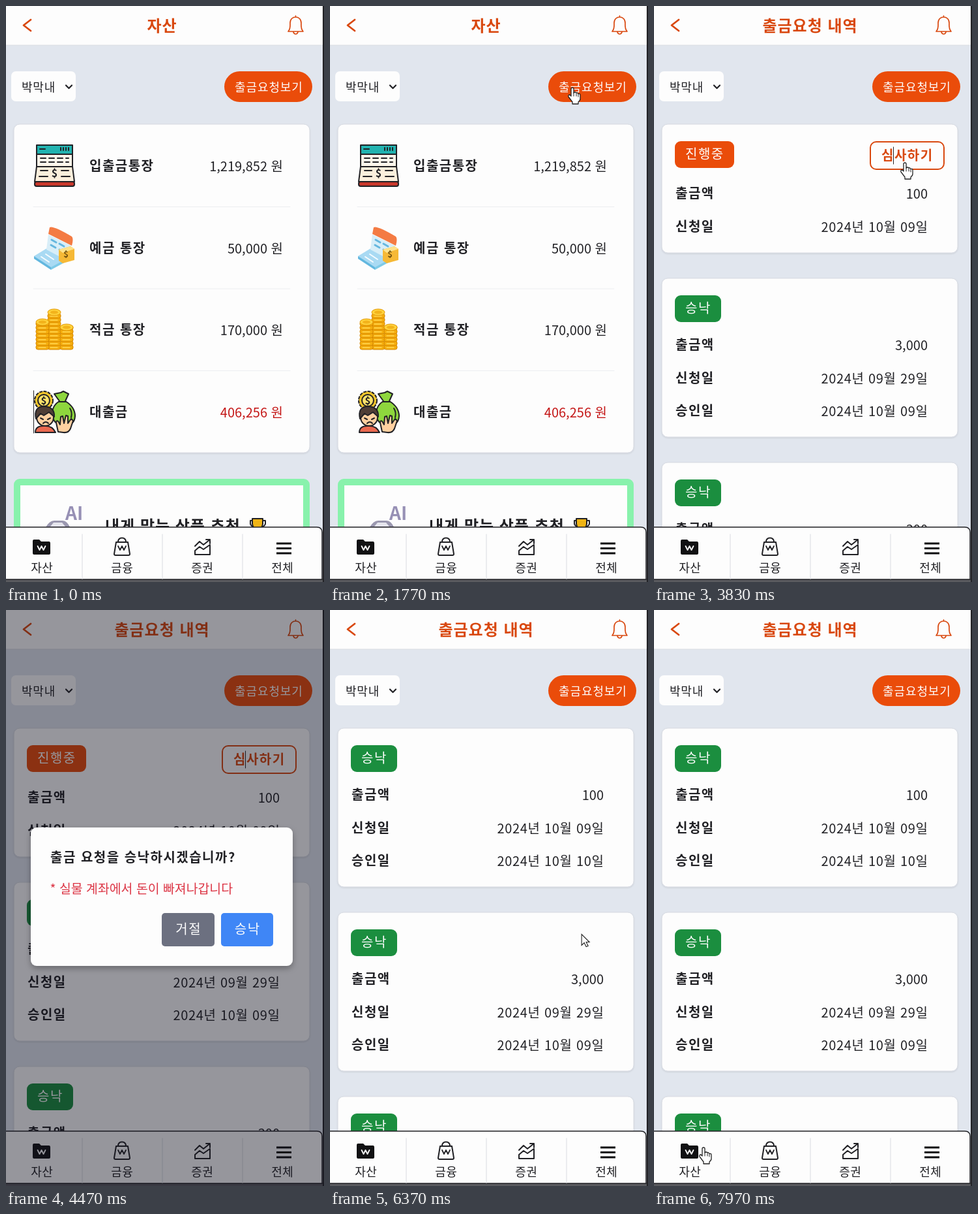
Recreate the animation shown at these times as an HTML page. Size 488x882 px, loop 8 s.

```html
<!DOCTYPE html>
<html lang="ko">
<head>
<meta charset="utf-8">
<title>출금요청</title>
<style>
  html, body { margin: 0; width: 100%; height: 100%; overflow: hidden; background: #e1e6ee; }
  svg { display: block; width: 100vw; height: 100vh; font-family: "Noto Sans CJK KR", "Noto Sans CJK", sans-serif; }
  .line { fill: none; stroke-linecap: round; stroke-linejoin: round; }
</style>
</head>
<body>
<svg id="stage" viewBox="0 0 488 882" preserveAspectRatio="none"></svg>
<script>
const LOOP = 8000, OPEN_LIST = 2050, CARET = 3700, OPEN_DIALOG = 4000, APPROVE = 6100;
const INK = '#212125', PAPER = '#fdfdfd', ORANGE = '#d9480f', BUTTON = '#ea4c0a', GREEN = '#1b8e3f';

// y is the vertical middle of the text line
function text(x, y, content, { size = 20, weight = 400, fill = INK, gap = 0, anchor = 'start' } = {}) {
  const shift = anchor === 'end' ? gap : anchor === 'middle' ? gap / 2 : 0;
  return `<text x="${x + shift}" y="${y + size * .37}" font-size="${size}" font-weight="${weight}"
    fill="${fill}" letter-spacing="${gap}" text-anchor="${anchor}">${content}</text>`;
}
const bold = (x, y, content, style) => text(x, y, content, { weight: 700, gap: 1.5, ...style });
const rect = (x, y, w, h, r, fill, extra = '') =>
  `<rect x="${x}" y="${y}" width="${w}" height="${h}" rx="${r}" fill="${fill}" ${extra}/>`;
const line = (d, stroke = INK, width = 2, extra = '') =>
  `<path class="line" d="${d}" stroke="${stroke}" stroke-width="${width}" ${extra}/>`;
const shape = (d, fill, extra = '') => `<path d="${d}" fill="${fill}" ${extra}/>`;
const circle = (x, y, r, fill, extra = '') => `<circle cx="${x}" cy="${y}" r="${r}" fill="${fill}" ${extra}/>`;
const panel = (y, h) => rect(12, y, 454, h, 9, PAPER, 'stroke="#d8dbe2" filter="url(#soft)"');
const outline = `stroke="${INK}" stroke-width="2" stroke-linejoin="round"`;

const passbook = () =>
  shape('M47 213H102V227H47Z', '#22b3b0', outline) +
  shape('M47 227H102V246H47Z', '#fdf6ea', outline) +
  shape('M47 246H102L105 269H44Z', '#fbefdc', outline) +
  rect(44, 269, 61, 7, 3, '#c8382c', outline) +
  line('M52 219H60M84 217V221M88 217V221M92 217V221M96 217V221', INK, 2) +
  line('M53 233H96M53 239H96', INK, 2, 'stroke-dasharray="8 5"') +
  line('M53 252H64M85 252H96M51 261H64M85 261H98') +
  text(74.5, 256, '$', { size: 16, weight: 700, anchor: 'middle' });

const deposit = () =>
  shape('M43 383L66 369L93 389L69 403Z', '#a9daf3') +
  shape('M43 383L69 400V404L43 387Z', '#62b7df') +
  shape('M69 400L93 387V391L69 404Z', '#7fcbe8') +
  shape('M65 350L100 367L96 391L62 373Z', '#d8eef8') +
  shape('M67 339Q72 336 101 353Q104 356 101 367L65 349Z', '#f47b43') +
  line('M70 358L77 362M82 364L89 368M69 366L76 370M82 373L88 376', '#65b7df', 3) +
  line('M54 384L66 392M61 380L73 388', '#f7fcff', 2) +
  shape('M81 373L99 368L105 372V389L87 394L81 390Z', '#f6b936') +
  shape('M81 373L99 368L105 372L87 378Z', '#ffe28a') +
  text(92, 380, '$', { size: 13, weight: 700, fill: '#765410', anchor: 'middle' });

function coins(x, top) {
  let out = '';
  for (let y = 522; y >= top + 5; y -= 6)
    out += rect(x - 10, y - 3, 20, 7, 3, '#f5ad0d', 'stroke="#d58600" stroke-width="1"') +
      line(`M${x - 6} ${y + 1}H${x + 5}`, '#ffd653', 1.4);
  return out + `<ellipse cx="${x}" cy="${top + 5}" rx="10" ry="5" fill="#ffd23c" stroke="#e39a08"/>` +
    `<ellipse cx="${x}" cy="${top + 5}" rx="6" ry="2.4" fill="#f3b31b"/>`;
}

const debt = () =>
  circle(58, 604, 14, '#f5c72b', `${outline} stroke-dasharray="5 1.5"`) +
  circle(58, 604, 9, '#ffe26a', outline) +
  text(58, 604, '$', { size: 15, weight: 700, anchor: 'middle' }) +
  shape('M82 605L74 594L84 592L88 590L96 594L91 605Q106 614 106 628Q105 643 89 642Q70 641 71 622Q72 611 82 605Z', '#8ed63d', outline) +
  line('M81 606H92M98 616Q102 622 100 630') +
  shape('M45 653Q45 643 58 643Q71 642 76 653Z', '#ea6950', outline) +
  circle(60, 630, 13, '#ffd0a0', outline) +
  shape('M46 632Q42 613 59 613Q75 614 74 629L66 622L58 627L53 624Z', '#4f3e36', outline) +
  line('M53 631L57 633M68 631L64 633M57 639Q61 635 65 639') +
  shape('M80 652L77 638Q77 634 80 636L83 641L84 629L87 628L89 639L92 627L95 628L95 639L100 632L103 635L99 647Q96 654 88 653Z', '#ffd0a0', outline);

function accounts() {
  const rows = [['입출금통장', '1,219,852'], ['예금 통장', '50,000'], ['적금 통장', '170,000'], ['대출금', '406,256']];
  const list = rows.map(([name, amount], i) => {
    const y = 245 + i * 125.5;
    return bold(128, y, name) +
      text(425, y + 1, amount + ' 원', { anchor: 'end', fill: i === 3 ? '#c41616' : INK }) +
      (i < 3 ? line(`M42 ${y + 62.5}H436`, '#eceef1', 1) : '');
  }).join('');
  return panel(181, 503) + list + passbook() + deposit() +
    coins(74, 464) + coins(56, 479) + coins(93, 487) + debt() +
    rect(12, 724, 454, 150, 9, '#88f2ac') + rect(22, 734, 434, 140, 0, PAPER) +
    bold(91, 777, 'AI', { size: 28, fill: '#9790b5', gap: 0 }) +
    shape('M60 800Q66 788 74 788H87Q94 788 99 800Z', '#9b98b0') +
    shape('M68 797L73 791H86L91 797Z', '#e5e5ed') +
    bold(152, 796, '내게 맞는 상품 추천', { size: 24, gap: 1 }) +
    line('M379 788H375V793Q376 797 382 798M393 788H398V793Q397 797 391 798', INK, 2) +
    shape('M378 785H394V793Q393 801 386 802Q379 801 378 793Z', '#efb414', outline);
}

function request(y, amount, asked, approved) {
  const rows = [['출금액', amount], ['신청일', asked]];
  if (approved) rows.push(['승인일', approved]);
  const first = y + (approved ? 102 : 106);
  const badge = approved ? ['승낙', 71, GREEN] : ['진행중', 91, BUTTON];
  return panel(y, approved ? 243 : 197) +
    rect(32, y + 26, badge[1], 41, 9, badge[2]) +
    text(48, y + 46, badge[0], { fill: PAPER, gap: 1.5 }) +
    (approved ? '' : rect(332, y + 27, 113, 42, 9, PAPER, `stroke="${ORANGE}" stroke-width="2"`) +
      bold(349, y + 48, '심사하기', { fill: ORANGE })) +
    rows.map(([label, value], i) => bold(33, first + i * 50.3, label) +
      text(420, first + 1 + i * 50.3, value, { anchor: 'end', gap: value.includes('년') ? .7 : 0 })).join('');
}

function requests(done) {
  const oct9 = '2024년 10월 09일', sep29 = '2024년 09월 29일';
  const next = done ? 463 : 417;
  return request(181, '100', oct9, done && '2024년 10월 10일') +
    request(next, '3,000', sep29, oct9) + request(next + 282, '300', sep29, oct9);
}

const title = content => bold(239, 30, content, { size: 24, fill: ORANGE, gap: 1, anchor: 'middle' });

const header = () => rect(0, 0, 486, 60, 0, PAPER) + line('M0 60H486', '#dadde3', 1) +
  line('M38 21L27 29.5L38 38', ORANGE, 2.8) +
  line('M433 39C437 35 436 29 436 26C436 20 440 17 444.5 17S453 20 453 26C453 29 452 35 456 39ZM441 40Q442 43 444.5 43T448 40M444.5 17V15', ORANGE, 1.7);

const controls = () => rect(8, 100, 99, 46, 7, PAPER) +
  text(24, 124, '박막내', { size: 18, gap: .8 }) + line('M92 121.5L96.5 126L101 121.5', INK, 2.2) +
  rect(335, 100, 135, 47, 23.5, BUTTON) +
  text(351, 124, '출금요청보기', { size: 18, fill: PAPER, gap: .9 });

function navigation() {
  const labels = ['자산', '금융', '증권', '전체'].map((label, i) =>
    text(55 + i * 123, 860, label, { size: 18, anchor: 'middle', gap: .6 })).join('');
  const won = (x, y, color) => line(`M${x - 6} ${y - 3}L${x - 3} ${y + 3}L${x} ${y - 3}L${x + 3} ${y + 3}L${x + 6} ${y - 3}`, color, 1.8);
  return rect(0, 877, 488, 5, 0, '#595a5e') +
    shape('M-2 798H477Q485 798 485 806V878H-2Z', PAPER, `stroke="${INK}" stroke-width="1.5"`) +
    line('M117 809V877M240 809V877M363 809V877', '#e2e4e8', 1.3) +
    shape('M41 819Q41 817 43 817H51L54 820H66Q68 820 68 823V838Q68 840 66 840H43Q41 840 41 838Z', '#111113') +
    won(54.5, 830, PAPER) +
    line('M169 821H187L190 839Q190 841 188 841H168Q166 841 166 839ZM172 821Q172 814.5 178 814.5T184 821', INK, 2) + won(178, 830, INK) +
    line('M290 827L297 820L303 825L313 817M307 817H313V823M290 840V834L297 828L303 832L313 825V840Z', INK, 2) +
    line('M415 823H438M415 830.5H438M415 838H438', '#0c0c0e', 3, 'style="stroke-linecap:butt"') + labels;
}

const dialog = () => rect(0, 0, 488, 882, 0, '#10101c', 'fill-opacity=".43"') +
  rect(38, 333, 402, 212, 9, PAPER, 'filter="url(#deep)"') +
  bold(68, 379, '출금 요청을 승낙하시겠습니까?') +
  text(67.5, 427, '* 실물 계좌에서 돈이 빠져나갑니다', { size: 19.4, fill: '#dc3545' }) +
  rect(239, 464, 81, 51, 5, '#6c7080') + rect(330, 464, 80, 51, 5, '#3f86f6') +
  text(279.5, 489, '거절', { fill: PAPER, weight: 500, gap: 1.5, anchor: 'middle' }) +
  text(370, 489, '승낙', { fill: PAPER, weight: 500, gap: 1.5, anchor: 'middle' });

const group = (id, content) => `<g id="${id}">${content}</g>`;
const stage = document.getElementById('stage');
stage.innerHTML = `<defs>
  <filter id="soft"><feDropShadow dx="0" dy="1" stdDeviation="1" flood-opacity=".12"/></filter>
  <filter id="deep"><feDropShadow dx="0" dy="4" stdDeviation="5" flood-opacity=".3"/></filter></defs>` +
  rect(0, 0, 488, 882, 0, '#e1e6ee') + header() + controls() +
  group('assetPage', title('자산') + accounts()) +
  group('listTitle', title('출금요청 내역')) +
  group('pendingPage', requests(false)) + group('approvedPage', requests(true)) +
  group('assetCaret', line('M42.5 589V654', INK, 1)) +
  group('buttonCaret', line('M367.5 216V242', INK, 1)) +
  navigation() + rect(486, 0, 2, 882, 0, '#242428') +
  group('modal', dialog()) +
  group('pointer',
    group('arrow', shape('M0 0V17L4 13L7 19L10 18L7 12H12Z', '#fff', 'stroke="#222" stroke-width="1.1"')) +
    group('hand', shape('M-2 2Q-2 0 0 0T2 2V8Q4 6 6 8Q8 7 9 10Q12 8 12 12V17Q12 20 9 22V25H0V22L-6 14Q-7 11 -4 11L-2 13Z', '#fff', 'stroke="#222" stroke-width="1.3" stroke-linejoin="round"') +
      line('M2 8V13M6 9V13M9 11V14', '#222', 1)));

const parts = Object.fromEntries([...stage.querySelectorAll('g[id]')].map(g => [g.id, g]));
const show = (id, visible) => parts[id].setAttribute('display', visible ? 'inline' : 'none');
const within = (t, from, to) => t >= from && t < to;

// time, x, y of the pointer's stops
const stops = [[900, 250, 420], [1550, 372, 125], [2150, 372, 125], [2650, 141, 332], [2850, 141, 332],
  [3500, 385, 240], [4000, 385, 240], [5500, 376, 486], [6100, 376, 492], [6600, 394, 500],
  [7050, 394, 500], [7750, 76, 823], [8000, 76, 823]];

function pointerAt(t) {
  const i = Math.max(1, stops.findIndex(stop => stop[0] > t));
  const [t0, x0, y0] = stops[i - 1], [t1, x1, y1] = stops[i];
  const p = Math.min(1, Math.max(0, (t - t0) / (t1 - t0)));
  const eased = p * p * (3 - 2 * p);
  return [x0 + (x1 - x0) * eased, y0 + (y1 - y0) * eased];
}

function draw(t) {
  const modal = within(t, OPEN_DIALOG, APPROVE);
  show('assetPage', t < OPEN_LIST);
  show('listTitle', t >= OPEN_LIST);
  show('pendingPage', within(t, OPEN_LIST, APPROVE));
  show('approvedPage', t >= APPROVE);
  show('modal', modal);
  show('assetCaret', t < OPEN_LIST && Math.floor(t / 530) % 2 === 0);
  show('buttonCaret', within(t, CARET, APPROVE) && (modal || Math.floor((t - CARET) / 530) % 2 === 0));

  const [x, y] = pointerAt(t);
  const inside = (left, top, right, bottom) => x > left && x < right && y > top && y < bottom;
  const hand = modal ? inside(330, 464, 410, 515)
    : inside(335, 100, 470, 147) || y > 798 ||
      (within(t, OPEN_LIST, OPEN_DIALOG) && inside(331, 207, 446, 252));
  show('pointer', within(t, 900, OPEN_DIALOG) || t >= 5500);
  show('hand', hand);
  show('arrow', !hand);
  parts.pointer.setAttribute('transform', `translate(${x} ${y})`);
}

function tick() {
  draw(performance.now() % LOOP);
  requestAnimationFrame(tick);
}
tick();
</script>
</body>
</html>
```
